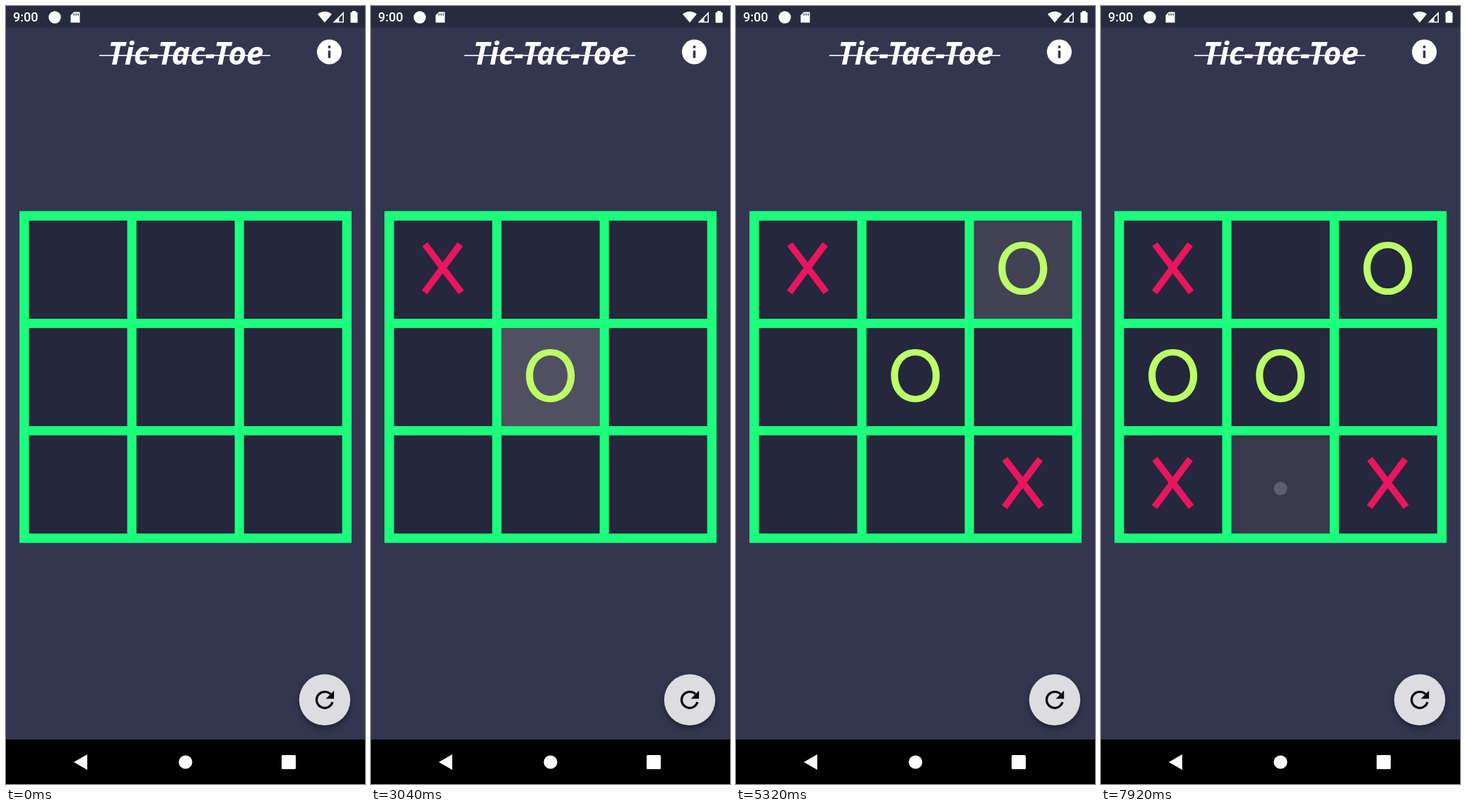
An HTML page with a canvas for the animation above (8 s loop, 508 px wide and 1102 px high).

```html
<!DOCTYPE html>
<html lang="en">
<head>
<meta charset="utf-8">
<title>Tic-Tac-Toe</title>
<style>
  html, body { margin: 0; width: 100%; height: 100%; overflow: hidden; background: #343650; }
  canvas { display: block; }
</style>
</head>
<body>
<canvas id="stage" width="508" height="1102"></canvas>
<script>
const ctx = document.getElementById('stage').getContext('2d');
const LOOP = 8000, STEP = 40;
const FADE = 200;          // ms for the highlight and for the splash fade
const DENSITY = 508 / 411; // stage pixels per logical pixel
const INK = 0.25;
const BG = '#343650', BAR = '#282a3e', CELL = '#25273c', GREEN = '#1bff7c';
const PINK = '#ea155f', LIME = '#bcff67', WHITE = '#fff';
const SIZE = 139, PITCH = 152.1, LEFT = 32.5, TOP = 304;

// show: first visible moment, down/up: press and release
const taps = [
  { col: 0, row: 0, mark: 'X', x: 114.5, y: 379.5, show: 1720, down: 1662, up: 1808 },
  { col: 1, row: 1, mark: 'O', x: 256, y: 527, show: 2800, down: 2785, up: 2960 },
  { col: 2, row: 2, mark: 'X', x: 397, y: 684.5, show: 3920, down: 3881, up: 4040 },
  { col: 2, row: 0, mark: 'O', x: 406, y: 377, show: 5040, down: 5030, up: 5202 },
  { col: 0, row: 2, mark: 'X', x: 104, y: 684, show: 5960, down: 5945, up: 6120 },
  { col: 0, row: 1, mark: 'O', x: 96.5, y: 529.5, show: 6840, down: 6852, up: 7040 },
  { col: 1, row: 2, mark: 'X', x: 254, y: 683.5, show: 7800, down: 7828, up: 8010 }
];

const clamp = v => Math.min(1, Math.max(0, v));
const cellX = col => LEFT + PITCH * col;
const cellY = row => TOP + PITCH * row;

function rect(x, y, w, h, color) {
  ctx.fillStyle = color;
  ctx.fillRect(x, y, w, h);
}

function disc(x, y, r, color) {
  ctx.fillStyle = color;
  ctx.beginPath();
  ctx.arc(x, y, r, 0, Math.PI * 2);
  ctx.fill();
}

function poly(color, ...points) {
  ctx.fillStyle = color;
  ctx.beginPath();
  points.forEach(([x, y]) => ctx.lineTo(x, y));
  ctx.closePath();
  ctx.fill();
}

function roundBox(x, y, w, h, r, color) {
  ctx.fillStyle = color;
  ctx.beginPath();
  ctx.roundRect(x, y, w, h, r);
  ctx.fill();
}

function statusBar() {
  rect(0, 0, 508, 30.5, BAR);
  ctx.fillStyle = WHITE;
  ctx.textAlign = 'left';
  ctx.font = '500 18px Roboto, sans-serif';
  ctx.fillText('9:00', 10, 22.3);
  disc(69, 16, 8.7, WHITE);

  // memory card
  poly(WHITE, [96, 8.5], [104.5, 8.5], [104.5, 23.5], [91.5, 23.5], [91.5, 13]);
  for (const x of [95.5, 98.5, 101.5]) rect(x, 10.5, 1.3, 3, BAR);

  // wifi
  ctx.fillStyle = WHITE;
  ctx.beginPath();
  ctx.moveTo(451, 23.5);
  ctx.lineTo(441, 11.5);
  ctx.quadraticCurveTo(451, 4, 461, 11.5);
  ctx.fill();

  // signal
  poly(WHITE, [462.5, 23.5], [478, 23.5], [478, 8]);
  poly(BAR, [471.5, 17], [476.4, 12], [476.4, 22], [471.5, 22]);

  // battery
  rect(490, 7, 5, 3, WHITE);
  roundBox(487.5, 8.7, 10, 15, 1, WHITE);
}

function header() {
  ctx.fillStyle = WHITE;
  ctx.textAlign = 'center';
  ctx.font = 'italic 700 44px "Noto Sans", "Open Sans", sans-serif';
  ctx.fillText('Tic-Tac-Toe', 254.5, 83);
  rect(132, 69.3, 242, 1.6, WHITE);

  disc(457.5, 65, 17.5, WHITE);
  rect(455.75, 56.2, 3.5, 3.5, BG);
  rect(455.75, 63.2, 3.5, 10.5, BG);
}

function refreshButton() {
  ctx.save();
  ctx.shadowColor = 'rgba(0,0,0,.42)';
  ctx.shadowBlur = 9;
  ctx.shadowOffsetY = 4;
  disc(451, 982.8, 36.2, '#dcdce1');
  ctx.restore();

  ctx.save();
  ctx.translate(451, 982.8);
  ctx.scale(1.64, 1.64);
  ctx.strokeStyle = '#080d08';
  ctx.lineWidth = 2;
  ctx.beginPath();
  ctx.arc(0, 0, 7, 0.29, Math.PI * 1.75);
  ctx.stroke();
  poly('#080d08', [1, -1], [8, -1], [8, -8]);
  ctx.restore();
}

function navBar() {
  rect(0, 1039, 508, 63, '#000');
  poly(WHITE, [96, 1071], [115, 1060], [115, 1082]);
  disc(254, 1071, 9.6, WHITE);
  roundBox(390, 1061, 20, 20, 1.5, WHITE);
}

function board() {
  rect(19, 290.5, 470, 470, GREEN);
  for (let i = 0; i < 9; i++) rect(cellX(i % 3), cellY(Math.floor(i / 3)), SIZE, SIZE, CELL);
}

function ripple(tap, t) {
  if (t < tap.show || t < tap.down) return;
  const x = cellX(tap.col), y = cellY(tap.row);
  const held = Math.min(t, tap.up) - tap.down;
  const freed = Math.max(0, t - tap.up);
  if (freed >= FADE) return;

  const glow = clamp(clamp(held / FADE) - freed / FADE);
  const reach = Math.hypot(
    Math.max(tap.x - x, x + SIZE - tap.x),
    Math.max(tap.y - y, y + SIZE - tap.y));
  const grown = clamp(held / 1000 + freed / (reach / DENSITY));

  ctx.save();
  ctx.beginPath();
  ctx.rect(x, y, SIZE, SIZE);
  ctx.clip();
  rect(x, y, SIZE, SIZE, `rgba(204,204,204,${INK * glow})`);
  disc(tap.x, tap.y, reach * grown, `rgba(204,204,204,${INK * (1 - freed / FADE)})`);
  ctx.restore();
}

function cross(x, y) {
  ctx.strokeStyle = PINK;
  ctx.lineWidth = 9.4;
  ctx.beginPath();
  ctx.moveTo(x - 25.5, y - 34);
  ctx.lineTo(x + 26, y + 34);
  ctx.moveTo(x + 24.5, y - 34);
  ctx.lineTo(x - 26, y + 34);
  ctx.stroke();
}

// Closed oval, a little fuller than an ellipse
function oval(x, y, rx, ry) {
  const kx = rx * 0.58, ky = ry * 0.58;
  ctx.moveTo(x, y - ry);
  ctx.bezierCurveTo(x + kx, y - ry, x + rx, y - ky, x + rx, y);
  ctx.bezierCurveTo(x + rx, y + ky, x + kx, y + ry, x, y + ry);
  ctx.bezierCurveTo(x - kx, y + ry, x - rx, y + ky, x - rx, y);
  ctx.bezierCurveTo(x - rx, y - ky, x - kx, y - ry, x, y - ry);
}

function nought(x, y) {
  ctx.fillStyle = LIME;
  ctx.beginPath();
  oval(x, y, 34.5, 37.6);
  oval(x, y, 24.4, 28.6);
  ctx.fill('evenodd');
}

function mark(tap, t) {
  if (t < tap.up) return;
  const x = 101.7 + PITCH * tap.col, y = 371.5 + PITCH * tap.row;
  (tap.mark === 'X' ? cross : nought)(x, y);
}

function draw() {
  const t = Math.floor((performance.now() % LOOP) / STEP) * STEP;
  rect(0, 0, 508, 1102, BG);
  statusBar();
  header();
  board();
  for (const tap of taps) {
    ripple(tap, t);
    mark(tap, t);
  }
  refreshButton();
  navBar();
  requestAnimationFrame(draw);
}
draw();
</script>
</body>
</html>
```
